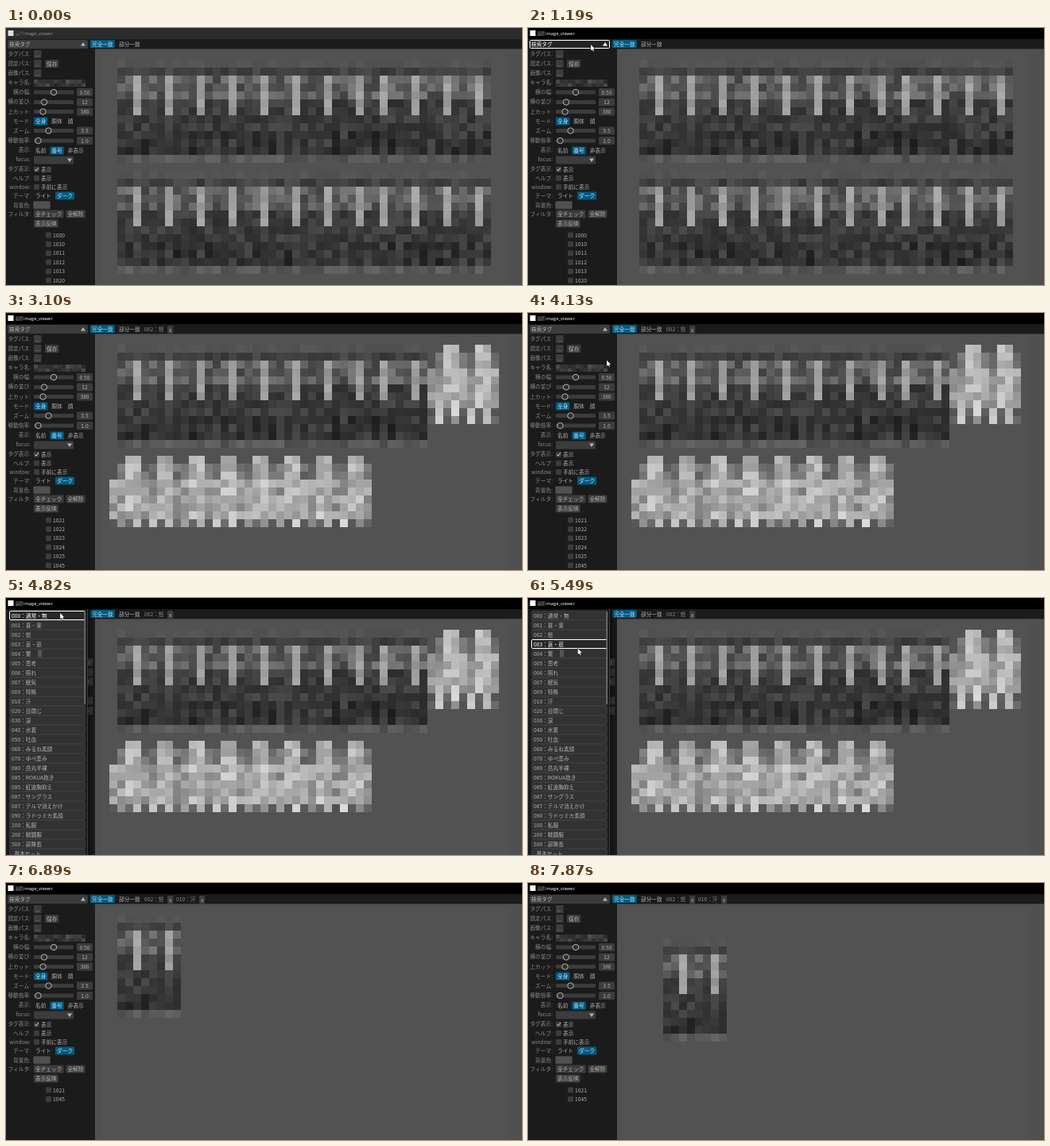
Write an HTML page with a canvas that moves like this. It is 649 by 324 pixels and loops after 8 s.

```html
<!DOCTYPE html>
<html lang="ja">
<head>
<meta charset="utf-8">
<title>image_viewer</title>
<style>
html, body { margin: 0; width: 100%; height: 100%; overflow: hidden; background: #1b1b1b; }
canvas { display: block; width: 649px; height: 324px; }
</style>
</head>
<body>
<canvas id="stage" width="649" height="324"></canvas>
<script>
const LOOP = 8000, CELL = 10, PITCH = 39.3, ROW = 12;
const ctx = document.getElementById('stage').getContext('2d');

const UI = '6.7px "Noto Sans CJK JP", "Noto Sans CJK", sans-serif';
const WIDGET = '#3c3c3c', PANEL = '#1b1b1b', BLUE = '#005c80', ON_BLUE = '#c0deff';
const LABEL = '#8c8c8c', TEXT = '#b4b4b4', WHITE = '#fff';

const TAGS = ['000：通常・無', '001：喜・楽', '002：怒', '003：哀・悲', '004：驚', '005：思考',
  '006：照れ', '007：眠気', '009：特殊', '010：汗', '020：目閉じ', '030：涙', '040：水着',
  '050：吐血', '060：みるね素顔', '070：ゆぺ歪み', '080：岳丸半裸', '085：ROKUA抱き',
  '085：紅波胸抑え', '087：サングラス', '087：テルマ消えかけ', '090：ラドゥミカ素顔',
  '100：私服', '200：戦闘服', '500：部隊長'];
const LABELS = ['タグパス', '設定パス', '画像パス', 'キャラ名', '横の幅', '横の並び', '上カット', 'モード',
  'ズーム', '移動倍率', '表示', 'focus', 'タグ表示', 'ヘルプ', 'window', 'テーマ', '背景色', 'フィルタ'];
const IDS = ['1000 1010 1011 1012 1013 1020', '1021 1022 1023 1024 1025 1045', '1021 1045'];

// Spans in which the screen refreshes, about every 140 ms
const BURSTS = [[380, 1330], [1460, 1460], [1730, 1880], [2160, 3100], [3220, 4260],
  [4420, 4420], [4690, 5620], [5770, 6740], [6890, 7870]];

// Pointer path: time, x, y
const PATH = [[0, 330, 340], [1190, 79, 21], [1460, 77, 21], [2410, 60, 47], [2560, 60, 47],
  [3100, 303, 335], [4260, 69, 19], [4900, 68, 19], [6330, 55, 128], [6460, 55, 128],
  [6740, 165, 92], [7870, 195, 122]];

const grey = v => `rgb(${v | 0},${v | 0},${v | 0})`;
const toGrid = v => Math.round(v / CELL) * CELL;
const rand = n => { const s = Math.sin(n * 12.9898 + 4.1) * 43758.5453; return s - Math.floor(s); };

function snap(t) {
  let last = 0;
  for (const [a, b] of BURSTS) {
    if (t + 20 < a) break;
    const step = (b - a) / Math.round((b - a) / 140) || 1;
    last = Math.min(b, a + step * Math.floor((t + 20 - a) / step));
  }
  return last;
}

function pointer(t) {
  let i = 0;
  while (i < PATH.length - 2 && PATH[i + 1][0] <= t) i++;
  const [t0, x0, y0] = PATH[i], [t1, x1, y1] = PATH[i + 1];
  const k = Math.min(1, (t - t0) / (t1 - t0));
  return { x: x0 + (x1 - x0) * k, y: y0 + (y1 - y0) * k };
}

function rect(x, y, w, h, fill) {
  ctx.fillStyle = fill;
  ctx.fillRect(x, y, w, h);
}

function box(x, y, w, h, fill, line) {
  ctx.beginPath();
  ctx.roundRect(x, y, w, h, 1.2);
  ctx.fillStyle = fill;
  ctx.fill();
  if (line) {
    ctx.strokeStyle = line;
    ctx.lineWidth = 1;
    ctx.stroke();
  }
}

function text(s, x, y, color = TEXT, align = 'left', font = UI) {
  ctx.font = font;
  ctx.textAlign = align;
  ctx.textBaseline = 'middle';
  ctx.fillStyle = color;
  ctx.fillText(s, x, y);
}

// Padded label; returns its right edge
function button(s, x, y, fill = WIDGET, color = TEXT) {
  ctx.font = UI;
  const w = ctx.measureText(s).width + 4;
  if (fill) box(x, y - 5, w, 10, fill);
  text(s, x + 2, y, color);
  return x + w;
}

function choices(list, active, y) {
  let x = 35;
  list.forEach((s, i) => {
    x = 3 + (i === active ? button(s, x, y, BLUE, ON_BLUE) : button(s, x, y, null));
  });
}

function triangle(x, y, dir, color) {
  ctx.beginPath();
  ctx.moveTo(x - 3, y + 2 * dir);
  ctx.lineTo(x + 3, y + 2 * dir);
  ctx.lineTo(x, y - 2.6 * dir);
  ctx.fillStyle = color;
  ctx.fill();
}

function slider(y, knob, value) {
  box(35, y - 2.5, 50, 5, WIDGET);
  ctx.beginPath();
  ctx.arc(knob, y, 3.7, 0, 7);
  ctx.fillStyle = '#303030';
  ctx.fill();
  ctx.strokeStyle = TEXT;
  ctx.lineWidth = 1;
  ctx.stroke();
  box(89, y - 5, 20, 10, WIDGET);
  text(value, 99, y, TEXT, 'center');
}

function check(x, y, s, on) {
  box(x, y - 3.5, 7, 7, WIDGET);
  if (on) {
    ctx.beginPath();
    ctx.moveTo(x + 1.5, y);
    ctx.lineTo(x + 3, y + 2);
    ctx.lineTo(x + 5.8, y - 2.2);
    ctx.strokeStyle = '#d0d0d0';
    ctx.lineWidth = 1;
    ctx.stroke();
  }
  text(s, x + 9, y);
}

function arrow({ x, y }) {
  ctx.beginPath();
  ctx.moveTo(x, y);
  for (const [dx, dy] of [[0, 7.5], [1.7, 6], [3, 8.4], [4, 7.8], [3, 5.5], [5.2, 5.3]])
    ctx.lineTo(x + dx, y + dy);
  ctx.closePath();
  ctx.strokeStyle = '#000';
  ctx.lineWidth = 1;
  ctx.stroke();
  ctx.fillStyle = WHITE;
  ctx.fill();
}

// Grey of one cell of a blurred figure; c and r count cells, n is noise in -1..1
function darkCell(c, r, n) {
  if (c > 1) return null;
  if (r < 0) return 84 + 5 * n;
  if (r === 0) return 66 + 14 * n;
  if (r > 10) return 88 + 14 * n;
  if (c === 0 && r < 6) return 158 + 14 * n;
  if (r < 4) return 94 + 30 * n;
  return (r > 7 && c % 2 ? 44 : 60) + 16 * n;
}

function paleCell(c, r, n) {
  const lit = c === 0 || c === 1;
  if (r < 0) return null;
  if (r < 3) return lit ? 176 + 28 * n : r > 0 && c > -2 ? 112 + 22 * n : null;
  if (r > 7) return c % 2 ? 175 + 45 * n : 95 + 15 * n;
  return (lit ? 182 : 156) + 34 * n;
}

function figure(shade, x, y, rows, seed) {
  for (let r = -1; r < rows; r++)
    for (let c = -2; c < 3; c++) {
      const v = shade(c, r, rand(seed * 97 + r * 7 + c) * 2 - 1);
      if (v) rect(toGrid(x) + c * CELL, toGrid(y) + r * CELL, CELL, CELL, grey(v));
    }
}

function view(stage, t, cur) {
  rect(112, 26, 537, 298, grey(80));
  rect(112, 26, 537, 1, grey(62));
  rect(120, 30, 510, 294, grey(82));
  const drag = 30 * Math.min(1, Math.max(0, (t - 6740) / 1130));
  const line = (shade, from, to, x, y, rows) => {
    for (let i = from; i < to; i++) figure(shade, x + PITCH * i, y, rows, i + y);
  };
  if (stage === 0) {
    for (let y = 50; y < 324; y += 140) line(darkCell, 0, 12, 160, y, 12);
  } else if (stage === 1) {
    line(darkCell, 0, 10, 160, 50, 12);
    line(paleCell, 10, 12, 160, 40, 10);
    line(paleCell, 0, 8, 150, 180, 9);
  } else {
    for (let i = 0; i < 2; i++) figure(darkCell, 160 + PITCH * i + drag, 50 + drag, 12, i + 50);
  }
  if (cur.x >= 120 && cur.y >= 30)
    rect(Math.floor(cur.x / CELL) * CELL, Math.floor(cur.y / CELL) * CELL, CELL, CELL, 'rgba(255,255,255,0.15)');
}

function titleBar(active) {
  rect(0, 0, 649, 14, active ? '#000' : '#2b2b2b');
  rect(2.5, 3, 7, 7, active ? WHITE : '#ddd');
  for (let i = 0; i < 6; i++)
    rect(12 + 3 * (i % 3), i > 2 ? 7 : 4, 3, 3, grey(38 + rand(i) * 40));
  text('image_viewer', 22, 7, active ? WHITE : '#999', 'left', '5.8px "Open Sans", "Noto Sans", sans-serif');
}

function tabs(stage) {
  button('完全一致', 106, 20, BLUE, ON_BLUE);
  text('部分一致', 142, 20);
  [TAGS[2], TAGS[9]].slice(0, stage).forEach((s, i) => {
    const x = 174 + 40 * i;
    text(s, x, 20.5, LABEL);
    button('x', x + 29, 21);
  });
}

function panel(stage, hover) {
  const ink = hover ? WHITE : TEXT;
  box(2.5, 15.5, 100, 10, hover ? '#242424' : WIDGET, hover ? WHITE : WIDGET);
  text('検索タグ', 4, 20, ink);
  triangle(97, 20.5, 1, ink);

  LABELS.forEach((s, i) => text(s + ':', 31, 32.3 + 12.13 * i - 0.85 * Math.max(0, i - 12), LABEL, 'right'));

  for (const y of [33, 45, 57]) button('...', 35, y);
  button('保存', 49, 45);
  for (let i = 0; i < 26; i++)
    rect(35 + 5 * (i >> 1), 65 + 5 * (i % 2), 5, 5 - i % 2, grey(36 + rand(i + 9) * 46));

  slider(81, 60, '0.50');
  slider(93.5, 48, '12');
  slider(105.5, 46.5, '380');
  choices(['全身', '胴体', '顔'], 0, 117.5);
  slider(129.5, 53.5, '3.5');
  slider(142, 40.5, '1.0');
  choices(['名前', '番号', '非表示'], 1, 154.5);
  box(35, 161.5, 50, 10, WIDGET);
  triangle(80, 166.5, -1, TEXT);
  ['表示', '表示', '手前に表示'].forEach((s, i) => check(35, 178.2 + 11.1 * i, s, i === 0));
  choices(['ライト', 'ダーク'], 1, 211.5);
  box(34.5, 218.5, 21, 9.5, grey(80), WIDGET);
  button('全解除', 3 + button('全チェック', 35, 234.5), 234.5);
  button('表示反映', 35, 246.5);
  IDS[stage].split(' ').forEach((id, i) => check(50, 261 + 11.45 * i, id));
}

function menu(cur) {
  const shade = ctx.createLinearGradient(102, 0, 112, 0);
  shade.addColorStop(0, 'rgba(0,0,0,0.5)');
  shade.addColorStop(1, 'rgba(0,0,0,0)');
  rect(102, 14, 10, 310, shade);
  rect(0, 14, 103, 310, PANEL);
  rect(102, 14, 1, 310, WIDGET);
  const over = Math.floor((cur.y - 16) / ROW);
  [...TAGS, ' 基本セット'].forEach((s, i) => {
    const y = 22 + ROW * i, hot = i === over;
    box(4.5, y - 5.5, 95, 11, hot ? '#282828' : '#323232', hot ? WHITE : '#3a3a3a');
    text(s, i < TAGS.length ? 7 : 9, y, hot ? WHITE : TEXT);
  });
  rect(40, 65.5, 5, 9, '#555');
  rect(98.5, 17, 1.5, 117, '#777');
}

function draw(now) {
  const t = snap(now % LOOP);
  const cur = pointer(t);
  const stage = t < 2500 ? 0 : t < 6440 ? 1 : 2;
  const open = (t > 1320 && t < 2500) || (t > 4680 && t < 6440);
  rect(0, 0, 649, 324, PANEL);
  titleBar(t >= 380);
  view(stage, t, cur);
  tabs(stage);
  panel(stage, !open && cur.x < 103 && cur.y < 26);
  if (open) menu(cur);
  if (cur.x < 120 || cur.y < 30) arrow(cur);
}

const start = performance.now();
function loop() {
  draw(performance.now() - start);
  requestAnimationFrame(loop);
}
loop();
</script>
</body>
</html>
```
